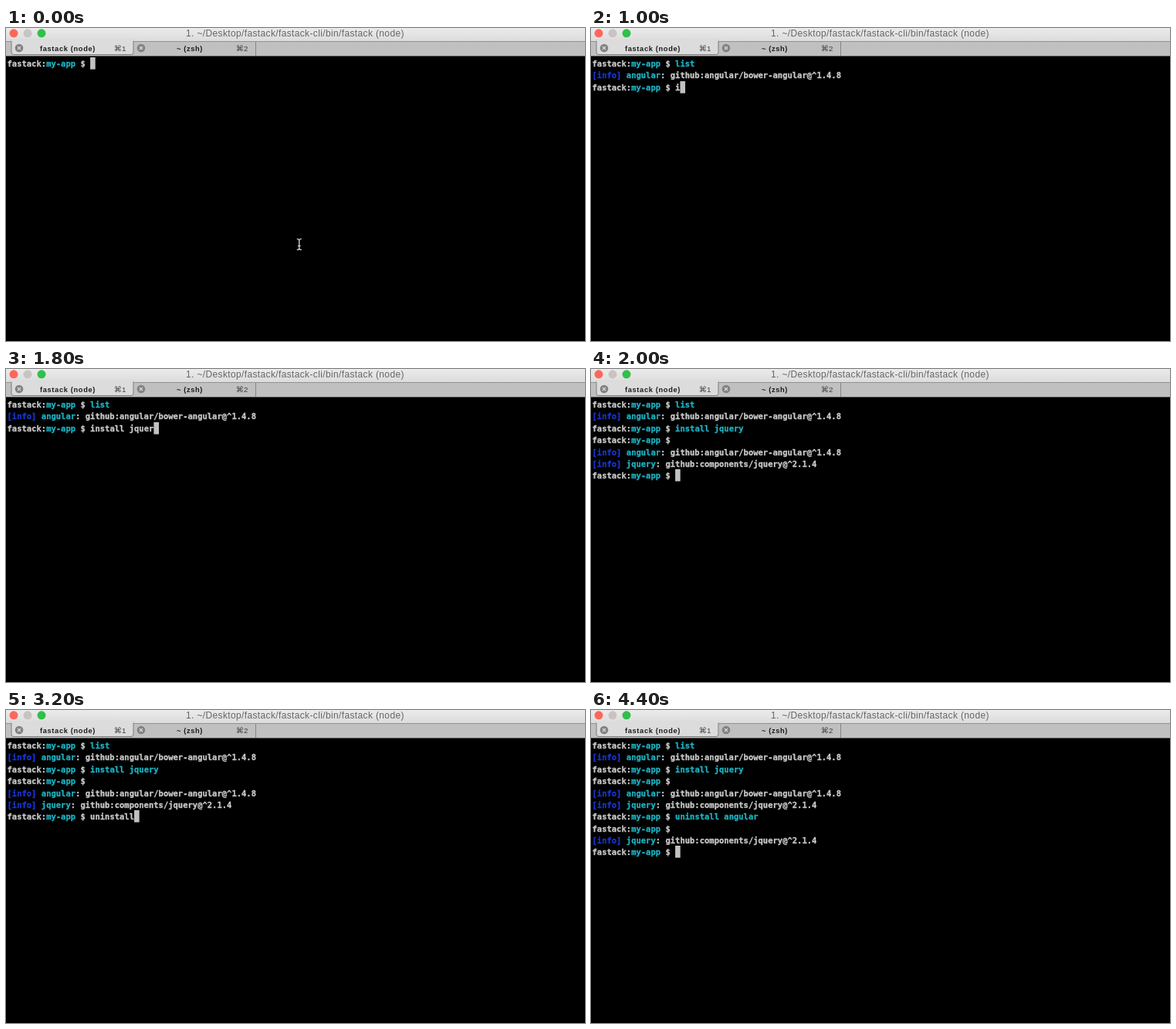
An HTML page with a canvas for the animation above (4.8 s loop, 750 by 406 pixels).

```html
<!DOCTYPE html>
<html lang="en">
<head>
<meta charset="utf-8">
<title>Terminal session</title>
<style>
html, body { margin: 0; width: 100%; height: 100%; overflow: hidden; background: #000; }
canvas { display: block; width: 750px; height: 406px; }
</style>
</head>
<body>
<canvas id="stage" width="750" height="406"></canvas>
<script>
const ctx = document.getElementById('stage').getContext('2d');
const LOOP = 4800, TICK = 200;
const CELL = 6.33, LINE = 15.375, LEFT = 1.5, TOP = 38, BASE = 12;
const WHITE = '#c9c9c9', CYAN = '#1cb3c3', BLUE = '#1836cf';
const MONO = 'bold 10.51px "DejaVu Sans Mono", monospace';
const SANS = '"Liberation Sans", Arial, sans-serif';

// Coloured runs that make up one terminal line
const prompt = (text = '', color = WHITE) =>
  [['fastack:', WHITE], ['my-app', CYAN], [' $ ', WHITE], [text, color]];
const info = (name, source) =>
  [['[info] ', BLUE], [name, CYAN], [': ' + source, WHITE]];

const angular = info('angular', 'github:angular/bower-angular@^1.4.8');
const jquery = info('jquery', 'github:components/jquery@^2.1.4');

// pace: characters per tick, gain: how much the typing speeds up
const commands = [
  { text: 'list', start: 200, run: 400, pace: 3, gain: 0, output: [angular] },
  { text: 'install jquery', start: 1000, run: 2000, pace: 2.2, gain: 0.2,
    output: [prompt(), angular, jquery] },
  { text: 'uninstall angular', start: 2600, run: 4000, pace: 8 / 3, gain: 0,
    output: [prompt(), jquery] }
];

function typed(t, { text, start, pace, gain }) {
  if (t < start) return '';
  const tick = Math.floor((t - start) / TICK);
  return text.slice(0, Math.round(1 + pace * tick + gain * tick * tick));
}

function screenAt(t) {
  const lines = [];
  for (const command of commands) {
    if (t < command.run) return [...lines, prompt(typed(t, command))];
    lines.push(prompt(command.text, CYAN), ...command.output);
  }
  return [...lines, prompt()];
}

function rect(x, y, w, h, color) {
  ctx.fillStyle = color;
  ctx.fillRect(x, y, w, h);
}

function disc(x, y, r, color) {
  ctx.fillStyle = color;
  ctx.beginPath();
  ctx.arc(x, y, r, 0, Math.PI * 2);
  ctx.fill();
}

function stroke(path, color, width) {
  ctx.strokeStyle = color;
  ctx.lineWidth = width;
  ctx.stroke(new Path2D(path));
}

function label(text, x, y, font, color, spacing = 0, align = 'left') {
  ctx.font = font;
  ctx.letterSpacing = spacing + 'px';
  ctx.textAlign = align;
  ctx.fillStyle = color;
  ctx.fillText(text, x, y);
}

function closeButton(x, y) {
  disc(x, y, 5.3, '#818181');
  stroke(`M${x - 2} ${y - 2}l4 4m0 -4l-4 4`, '#d8d8d8', 1.3);
}

function tab(x, title, key) {
  closeButton(x + 10, 26);
  label(title, x + 73, 29.6, `bold 9.3px ${SANS}`, '#1c1c1c', 0.64, 'center');
  label('⌘' + key, x + 133, 30, `9.8px ${SANS}, "DejaVu Sans"`, '#3c3c3c', 0.3);
}

function drawWindow() {
  const bar = ctx.createLinearGradient(0, 0, 0, 17);
  bar.addColorStop(0, '#ebebeb');
  bar.addColorStop(1, '#dcdcdc');
  rect(0, 0, 750, 17, bar);
  ['#fc675b', '#c9c3c3', '#30c04b'].forEach((color, i) =>
    disc(10 + 18 * i, 6.8, 5.5, color));
  label('1. ~/Desktop/fastack/fastack-cli/bin/fastack (node)', 233, 11.2,
    `12px ${SANS}`, '#666', 0.36);

  rect(0, 17, 750, 19.4, '#c0c0c0');
  rect(0, 17, 750, 1, '#929292');
  rect(323, 17, 1, 19, '#858585');

  ctx.fillStyle = '#dcdcdc';
  ctx.strokeStyle = '#7d7d7d';
  ctx.lineWidth = 1;
  ctx.beginPath();
  ctx.roundRect(7, 15, 158, 19.5, [0, 0, 3, 3]);
  ctx.fill();
  ctx.stroke();
  rect(6.5, 14, 159, 3, '#dcdcdc');

  tab(7, 'fastack (node)', 1);
  tab(165, '~ (zsh)', 2);
}

function drawLine(runs, row) {
  let column = 0;
  for (const [text, color] of runs) {
    const x = LEFT + column * CELL, y = TOP + BASE + row * LINE;
    label(text, x, y, MONO, color);
    ctx.strokeStyle = color;
    ctx.lineWidth = 0.3;
    ctx.strokeText(text, x, y);
    column += text.length;
  }
  return column;
}

function drawPointer(x, y) {
  stroke(`M${x - 3} ${y}q3 0 3 2q0 -2 3 -2m-3 1v12m-3 1q3 0 3 -2q0 2 3 2m-4.8 -5h3.6`,
    '#d8d8d8', 1.3);
}

function draw(t) {
  rect(0, 0, 750, 406, '#000');
  drawWindow();
  const lines = screenAt(t);
  const column = lines.map(drawLine).pop();
  rect(LEFT + column * CELL, Math.round(TOP + (lines.length - 1) * LINE), 6.6, 15.6, '#c2c2c2');
  if (t < 200) drawPointer(379.8, 273.7);
}

const start = performance.now();
function frame() {
  draw((performance.now() - start) % LOOP);
  requestAnimationFrame(frame);
}
frame();
</script>
</body>
</html>
```
